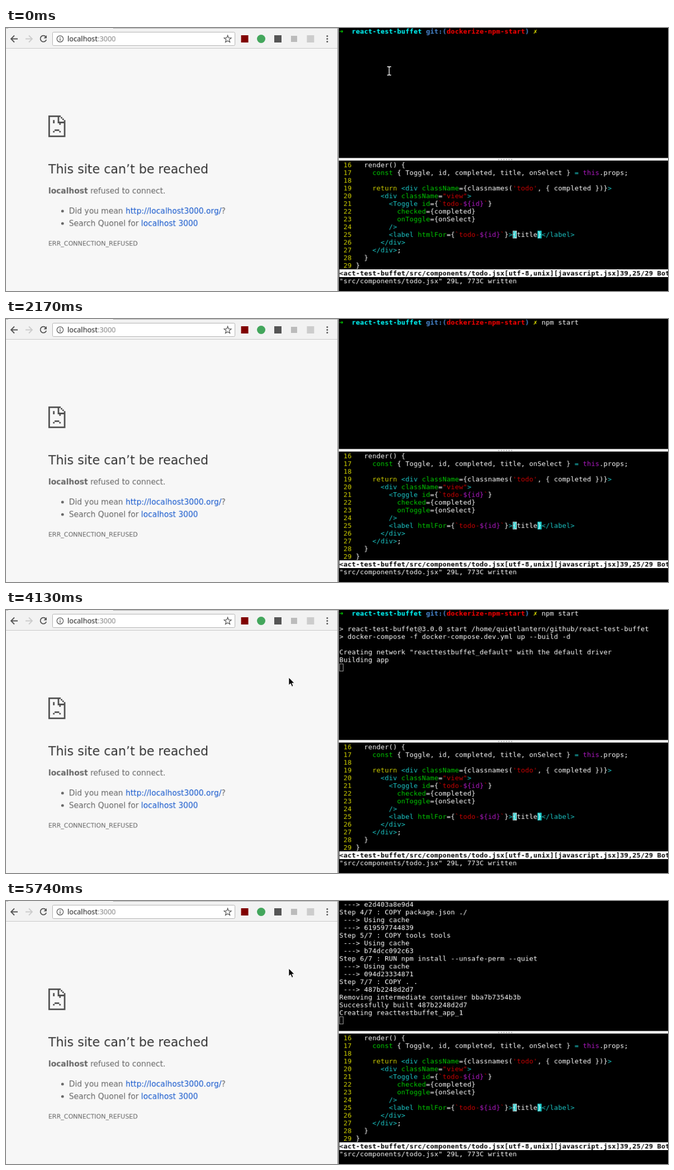
An HTML page with a canvas that plays this animation: 1187 px wide and 472 px high, repeating every 8000 ms.

```html
<!DOCTYPE html>
<html lang="en">
<head>
<meta charset="utf-8">
<title>npm start</title>
<style>
html, body { margin: 0; width: 100%; height: 100%; overflow: hidden; background: #000; }
svg, canvas { position: absolute; left: 0; top: 0; width: 1187px; height: 472px; }
</style>
</head>
<body>
<svg>
  <!-- browser window -->
  <rect width="594" height="472" fill="#f7f7f7"/>
  <rect width="594" height="37" fill="#f2f2f2"/>
  <path d="M0 .5H4M192 .5H594" stroke="#b0b0b0"/>
  <path d="M0 36.5H594" stroke="#c8c8c8"/>
  <rect x="594" width="3" height="472" fill="#a0a0a0"/>
  <rect x="83.5" y="7.5" width="327" height="24" rx="2" fill="#fff" stroke="#b4b4b4"/>
  <g fill="none" stroke="#555" stroke-width="1.8">
    <path d="M21 19.5H9M15 13.5L9 19.5L15 25.5"/>
    <path d="M35 19.5H47M41 13.5L47 19.5L41 25.5" stroke="#ccc"/>
    <path d="M71.3 15.6A5.5 5.5 0 1 0 72.3 21"/>
    <path d="M73 13V18.5H67.5Z" fill="#555" stroke="none"/>
    <circle cx="97" cy="19.5" r="5.7" stroke-width="1.2"/>
    <path d="M97 18.6V23M97 16V17.4" stroke-width="1.3"/>
    <path id="star" stroke-width="1.2"/>
  </g>
  <rect x="421.5" y="13" width="13" height="13" fill="#800000"/>
  <circle cx="457.5" cy="19.5" r="7.5" fill="#43a65c"/>
  <rect x="481" y="13" width="13" height="13" fill="#555"/>
  <rect x="511" y="14" width="11" height="11" fill="#bbb"/>
  <rect x="539.5" y="13" width="13" height="13" fill="#ccc"/>
  <path d="M576 14.5h0M576 19.5h0M576 24.5h0" stroke="#555" stroke-width="3" stroke-linecap="round"/>
  <!-- sad page, on a grid of 11 by 14 cells -->
  <g transform="translate(76 157) scale(2.775)" fill="none" stroke="#525252">
    <path d="M8 .5H.5V13.5H10.5V3M6.5 0V4.5H11M8 1.5H9M9 2.5H10"/>
    <path d="M3.5 3V5M7.5 5V6M4 9.5H7M3 10.5H4M7 10.5H8"/>
  </g>
</svg>
<canvas id="screen" width="1283" height="510"></canvas>
<svg>
  <path id="beam" d="M-3.5 -7.5H-1L0 -6.5L1 -7.5H3.5M0 -6.5V6.5M-3.5 7.5H-1L0 6.5L1 7.5H3.5" fill="none" stroke="#fff" stroke-width="1.3"/>
  <path id="arrow" d="M0 0V14L3.3 11L5.6 16.4L8 15.4L5.8 10.2H10Z" fill="#000" stroke="#fff" stroke-width=".9"/>
</svg>
<script>
const $ = id => document.getElementById(id);
const LOOP = 8000;

// The desktop is laid out at its native size; CSS scales the canvas to the stage.
const ctx = $('screen').getContext('2d');
const CELL_W = 8, CELL_H = 15, TERM_X = 646, SHELL_Y = -1, VIM_Y = 258;

// "~x" switches to style x until the next "~"
const STYLES = {
  w: { color: '#fff' }, y: { color: '#d2d200' }, g: { color: '#00cd00' },
  c: { color: '#1cc8c8' }, m: { color: '#b31ac8' }, r: { color: '#cd0000' },
  G: { color: '#0d0', bold: true }, C: { color: '#0ff', bold: true },
  B: { color: '#4a8ad4', bold: true }, R: { color: '#f00', bold: true },
  Y: { color: '#ee0', bold: true }, S: { color: '#000', bold: true, back: '#fff' },
  h: { color: '#fff', back: '#1cc8c8' }, H: { color: '#fff', back: '#1cc8c8', box: '#ccc' },
  k: { back: '#aaa' }, o: { box: '#aaa' }
};
const PROMPT = '~G➜~w  ~Creact-test-buffet~w ~Bgit:(~Rdockerize-npm-start~B)~w ~Y✗~w ';
const COMMAND = 'npm start';
const KEYS = [210, 350, 560, 700, 840, 1050, 1120, 1260, 1470];
const ENTER = 1540;
const BLOCK = '~k ', HOLLOW = '~o ';

const STARTED = [
  '> react-test-buffet@3.0.0 start /home/quietlantern/github/react-test-buffet',
  '> docker-compose -f docker-compose.dev.yml up --build -d',
  ''
];
const step = (n, command, hash) =>
  [`Step ${n}/7 : ${command}`, ' ---> Using cache', ` ---> ${hash}`];
const BUILD = [
  ' ---> Using cache', ' ---> 47775dbe9ba6',
  ...step(3, 'WORKDIR /usr/src/app', 'e2d403a8e9d4'),
  ...step(4, 'COPY package.json ./', '619597744839'),
  ...step(5, 'COPY tools tools', 'b74dcc092c63'),
  ...step(6, 'RUN npm install --unsafe-perm --quiet', '094d23334871'),
  'Step 7/7 : COPY . .',
  ' ---> 487b2248d2d7',
  'Removing intermediate container bba7b7354b3b',
  'Successfully built 487b2248d2d7',
  'Creating reacttestbuffet_app_1'
];
const CODE = [
  '  render() {',
  '    ~gconst~w { Toggle, id, completed, title, onSelect } ~c=~w ~mthis~w.props;',
  '',
  "    ~yreturn~w ~c<div ~gclassName~w={classnames(~r'todo'~w, { completed })}~c>",
  '      ~c<div ~gclassName~w=~r"view"~c>',
  '        ~c<Toggle ~gid~w={~r`todo-~m${id}~r`~w}',
  '          ~gchecked~w={completed}',
  '          ~gonToggle~w={onSelect}',
  '        ~c/>',
  '        ~c<label ~ghtmlFor~w={~r`todo-~m${id}~r`~w}~c>~H{~wtitle~h}~c</label>',
  '      ~c</div>',
  '    ~c</div>~w;',
  '  }',
  '}'
];

function drawRun(text, x, y, { color, bold, back, box }) {
  const width = text.length * CELL_W;
  if (back) {
    ctx.fillStyle = back;
    ctx.fillRect(x, y, width, CELL_H);
  }
  if (box) {
    ctx.strokeStyle = box;
    ctx.strokeRect(x + .5, y + .5, width - 1, CELL_H - 1);
  }
  ctx.fillStyle = color || '#fff';
  ctx.font = `${bold ? 'bold ' : ''}13px "DejaVu Sans Mono", monospace`;
  [...text].forEach((ch, i) => ctx.fillText(ch, x + i * CELL_W, y + 12));
  return x + width;
}

function drawLines(lines, top) {
  lines.forEach((line, row) => {
    const runs = (line[0] === '~' ? line.slice(1) : 'w' + line).split('~');
    let x = TERM_X;
    for (const run of runs) x = drawRun(run.slice(1), x, top + row * CELL_H, STYLES[run[0]]);
  });
}

function label(text, x, y, font, color = '#646464') {
  ctx.font = font;
  ctx.fillStyle = color;
  ctx.fillText(text, x, y);
  return x + ctx.measureText(text).width;
}

function drawPage() {
  const sans = '"DejaVu Sans", sans-serif', body = `15px ${sans}`, url = '13.84px "Noto Sans", sans-serif';
  const bullet = y => {
    ctx.beginPath();
    ctx.arc(109.5, y - 5, 2.6, 0, 7);
    ctx.fill();
  };
  let x = label('localhost', 119, 26, url, '#222');
  label(':3000', x, 26, url, '#888');
  label('This site can’t be reached', 82, 282, `24px ${sans}`, '#333');
  x = label('localhost', 82, 321, `bold ${body}`);
  label(' refused to connect.', x, 321, body);
  x = label('Did you mean ', 122, 360, body);
  bullet(360);
  x = label('http://localhost3000.org/', x, 360, body, '#15c');
  label('?', x, 360, body);
  x = label('Search Quonel for ', 122, 384, body);
  bullet(384);
  label('localhost 3000', x, 384, body, '#15c');
  label('ERR_CONNECTION_REFUSED', 82, 422, `12px ${sans}`);
}

function drawVim() {
  ctx.fillStyle = '#000';
  ctx.fillRect(645, 257, 638, 253);
  ctx.fillStyle = '#f2f2f2';
  ctx.fillRect(645, 252, 638, 5);
  ctx.fillStyle = '#aaa';
  for (let x = 954; x < 980; x += 5) ctx.fillRect(x, 254, 2, 2);
  drawLines([
    ...CODE.map((line, i) => `~y ${16 + i} ~w${line}`),
    '~S<act-test-buffet/src/components/todo.jsx[utf-8,unix][javascript.jsx]39,25/29 Bot',
    '"src/components/todo.jsx" 29L, 773C written'
  ], VIM_Y);
}

function shellLines(t) {
  if (t >= 4760) {
    const top = t < 5670 ? 0 : t < 5740 ? 3 : 4;
    return [...BUILD.slice(top, top + 15), HOLLOW];
  }
  const typed = COMMAND.slice(0, KEYS.filter(k => t >= k).length);
  const lines = [PROMPT + typed];
  if (t < ENTER) {
    if (t >= 70) lines[0] += BLOCK;
    return lines;
  }
  if (t < 2660) return [...lines, t < 2170 ? BLOCK : ''];
  lines.push('', ...STARTED);
  if (t >= 3290) lines.push('Creating network "reacttestbuffet_default" with the default driver');
  if (t >= 3570) lines.push('Building app');
  if (t >= 3290) lines.push(t < 3920 ? BLOCK : t < 4130 ? '' : HOLLOW);
  return lines;
}

let shown = '';
function drawShell(t) {
  const lines = shellLines(t), key = lines.join('\n');
  if (key === shown) return;
  shown = key;
  ctx.fillStyle = '#000';
  ctx.fillRect(645, 0, 638, 252);
  drawLines(lines, SHELL_Y);
}

function movePointer(t) {
  const p = Math.min(1, Math.max(0, Math.floor((t - 3080) / 70) / 11));
  const x = 687 - 180 * p ** 1.15;
  const y = 77 + 44 * (1 - (1 - p) ** 1.4);
  const visible = t < 210 || t >= 3080;
  const place = (id, on) => {
    $(id).setAttribute('transform', `translate(${x} ${y})`);
    $(id).style.display = on ? '' : 'none';
  };
  place('beam', visible && x >= 597);
  place('arrow', visible && x < 597);
}

$('star').setAttribute('d', 'M' + Array.from({ length: 10 }, (_, i) => {
  const r = i % 2 ? 2.9 : 6.8, a = i * Math.PI / 5;
  return `${397.5 + r * Math.sin(a)} ${20 - r * Math.cos(a)}`;
}).join('L') + 'Z');

drawPage();
drawVim();
const start = performance.now();
(function tick() {
  const t = (performance.now() - start) % LOOP;
  drawShell(t);
  movePointer(t);
  requestAnimationFrame(tick);
})();
</script>
</body>
</html>
```
